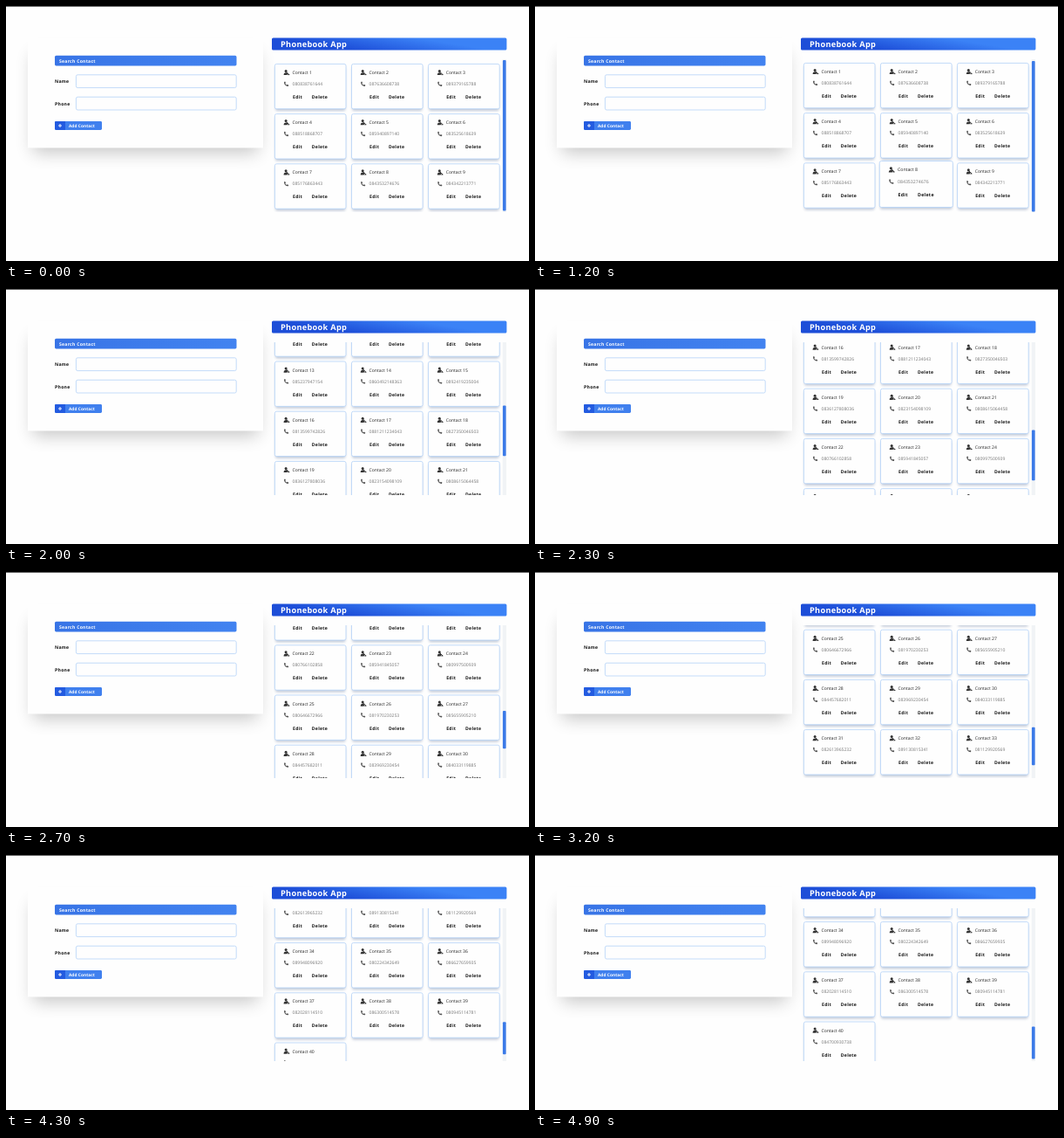
Animation, 600 px wide and 292 px high, one loop 5.5 s. Source, as an HTML page:

```html
<!DOCTYPE html>
<html lang="en">
<head>
<meta charset="utf-8">
<title>Phonebook App</title>
<style>
  html, body { margin: 0; width: 100%; height: 100%; overflow: hidden; background: #fefefe; }
  svg { display: block; width: 600px; height: 292px; }
  text { font: 5.05px "Open Sans", "Noto Sans", sans-serif; fill: #222; text-rendering: geometricPrecision; white-space: pre; }
  .bold { font-weight: 700; font-size: 5.1px; letter-spacing: .3px; fill: #111; }
  .white { fill: #fff; }
  .title { font-size: 9.2px; }
  .bar { font-size: 5.1px; letter-spacing: .25px; }
  .add { font-size: 4.8px; letter-spacing: .05px; }
  .num { fill: #777; }
  .field, .box { fill: #fefefe; stroke: #b4d2f8; stroke-width: .8; }
</style>
</head>
<body>
<svg viewBox="0 0 600 292" xmlns="http://www.w3.org/2000/svg">
  <defs>
    <linearGradient id="head" gradientUnits="userSpaceOnUse" x1="432" y1="56" x2="436" y2="31">
      <stop offset="0" stop-color="#1d4ed8"/><stop offset="1" stop-color="#3b82f6"/>
    </linearGradient>
    <linearGradient id="blue" x2="1" y2="0">
      <stop offset="0" stop-color="#3874e6"/><stop offset="1" stop-color="#4283f0"/>
    </linearGradient>
    <filter id="soft" x="-20%" y="-30%" width="140%" height="170%"><feGaussianBlur stdDeviation="10"/></filter>
    <filter id="lift" x="-10%" y="-10%" width="120%" height="130%"><feGaussianBlur stdDeviation="1.6"/></filter>
    <clipPath id="view"><rect x="303" y="61" width="272" height="175"/></clipPath>
    <g id="person" fill="#333">
      <circle cx="13.1" cy="8.4" r="1.5"/>
      <path d="M10.6 13.1c0-2 1-2.9 2.4-2.9 1.5 0 2 .6 2.3 1.3l-.9 1.6z"/>
      <path d="M13.6 9.4l3.2 3.2M15.2 12.6h2" stroke="#333" stroke-width="1" fill="none"/>
    </g>
    <path id="handset" fill="#555" d="M11 20.9l1.2-.4.8 1.6-.7.7q.6 1.2 1.6 1.7l.8-.7 1.5.8-.4 1.3q-2.1.3-3.6-1.4-1.4-1.6-1.2-3.6z"/>
  </defs>

  <rect width="600" height="292" fill="#fefefe"/>
  <rect width="600" height="1" fill="#666"/>

  <rect x="31" y="55" width="258" height="113" fill="#000" opacity=".22" filter="url(#soft)"/>
  <rect x="25" y="37" width="270" height="125.5" fill="#fefefe"/>
  <rect x="56" y="56.8" width="208.5" height="11.6" rx="1.6" fill="url(#blue)"/>
  <text class="bold bar white" x="61" y="64.6">Search Contact</text>
  <text class="bold" x="56" y="88">Name</text>
  <rect class="field" x="80.4" y="78.8" width="183.8" height="14.8" rx="1.8"/>
  <text class="bold" x="56" y="113.5">Phone</text>
  <rect class="field" x="80.4" y="104.2" width="183.8" height="14.8" rx="1.8"/>
  <rect x="56" y="132" width="54" height="10" rx="1.4" fill="#4080ee"/>
  <path d="M68 132H57.4Q56 132 56 133.4v7.2q0 1.4 1.4 1.4H68z" fill="#235be0"/>
  <path d="M60 137h4M62 135v4" stroke="#fff" stroke-width=".9"/>
  <text class="bold add white" x="72" y="138.8">Add Contact</text>

  <rect x="305" y="36.5" width="269.4" height="14" rx="1.6" fill="url(#head)"/>
  <text class="bold title white" x="315" y="46.9">Phonebook App</text>

  <g clip-path="url(#view)">
    <g id="list"></g>
    <rect x="569.7" y="61" width="4.2" height="175" fill="#f1f3f6"/>
    <rect id="thumb" x="569.9" width="3.7" rx="1" fill="#3b7ae8"/>
  </g>
</svg>
<script>
const LOOP = 5500, STEP = 100, ROW = 57.2, VIEW = 175, TOP = 61, TOTAL = 40, HOVERED = 8;

// [time, value] pairs, linear in between
const SCROLL = [[0, 0], [1100, 0], [1200, 1], [1700, 129], [2300, 295.4], [2700, 383],
  [3700, 532.6], [3800, 532.6], [4300, 595], [4600, 595], [4900, 619]];
const HOVER = [[0, 0], [400, 0], [700, 1], [1700, 1], [1800, 0]];
const LOADED = [[0, 9], [1300, 18], [1900, 27], [2600, 36], [3600, TOTAL]];

const list = document.getElementById('list');
const thumb = document.getElementById('thumb');

let seed = 4127;
function digit() {
  seed = seed * 16807 % 2147483647;
  return Math.floor(seed / 2147483647 * 10);
}

function phone(n) {
  const length = n >= 14 && n <= 21 ? 13 : 12;
  return '08' + Array.from({ length: length - 2 }, digit).join('');
}

function place(n) {
  const i = n - 1;
  return [308 + i % 3 * 88.1, 66 + Math.floor(i / 3) * ROW];
}

function makeCard(n) {
  const g = document.createElementNS('http://www.w3.org/2000/svg', 'g');
  g.setAttribute('transform', `translate(${place(n)})`);
  g.innerHTML = `
    <rect x="1" y="3" width="80.4" height="51" rx="2" fill="#1e3a70" opacity=".27" filter="url(#lift)"/>
    <rect class="box" x=".4" y=".4" width="81.6" height="51.4" rx="2"/>
    <use href="#person"/><use href="#handset"/>
    <text x="20.5" y="12">Contact ${n}</text>
    <text class="num" x="20.5" y="25.1">${phone(n)}</text>
    <text class="bold" x="21" y="40.1">Edit</text>
    <text class="bold" x="42.8" y="40.1">Delete</text>`;
  list.append(g);
  return g;
}

const cards = Array.from({ length: TOTAL }, (_, i) => makeCard(i + 1));

function tween(keys, t) {
  const i = keys.findIndex(k => k[0] > t);
  if (i < 0) return keys[keys.length - 1][1];
  const [t0, a] = keys[i - 1], [t1, b] = keys[i];
  return a + (b - a) * (t - t0) / (t1 - t0);
}

function draw(t) {
  const y = tween(SCROLL, t);
  const count = LOADED.filter(k => k[0] <= t).pop()[1];
  const height = Math.ceil(count / 3) * ROW + 5;

  list.setAttribute('transform', `translate(0 ${-y})`);
  cards.forEach((c, i) => c.style.display = i < count ? '' : 'none');

  const h = tween(HOVER, t), [cx, cy] = place(HOVERED);
  cards[HOVERED - 1].setAttribute('transform',
    `translate(${cx + 41.2} ${cy + 26 - 1.5 * h}) scale(${1 + .03 * h}) translate(-41.2 -26)`);

  thumb.setAttribute('y', TOP + 1 + y * VIEW / height);
  thumb.setAttribute('height', VIEW * VIEW / height - 1);
}

const start = performance.now();
function tick() {
  const t = (performance.now() - start) % LOOP;
  draw(Math.floor(t / STEP) * STEP);
  requestAnimationFrame(tick);
}
draw(0);
requestAnimationFrame(tick);
</script>
</body>
</html>
```
